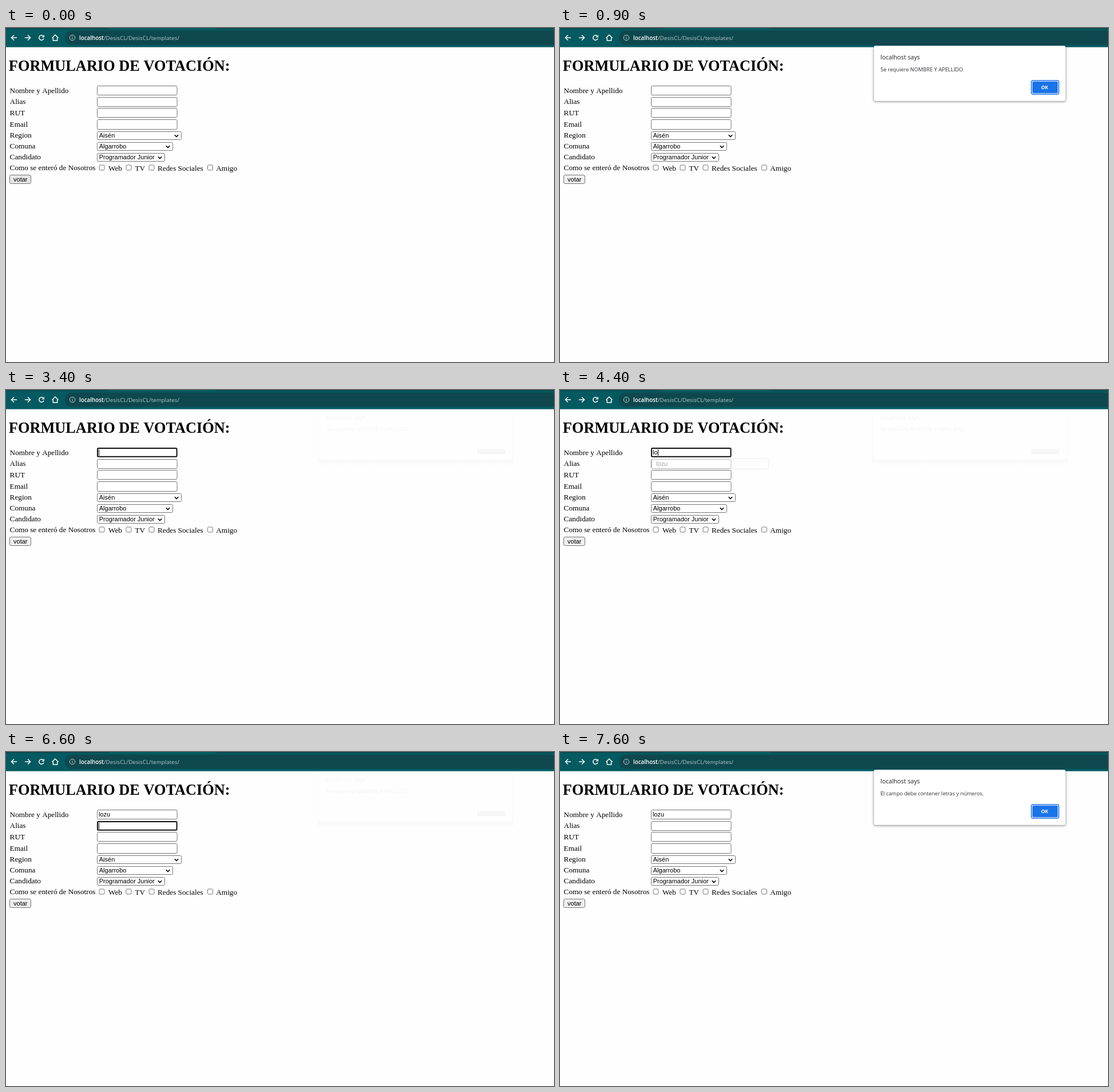
An HTML page with a canvas that plays this animation: 958 by 585 pixels, repeating every 8000 ms.

```html
<!DOCTYPE html>
<html lang="es">
<head>
<meta charset="utf-8">
<title>Formulario de votación</title>
<style>
html, body { margin: 0; width: 100%; height: 100%; overflow: hidden; background: #fefefe; }
canvas { display: block; }
</style>
</head>
<body>
<canvas id="stage" width="958" height="585"></canvas>
<script>
const ctx = document.getElementById('stage').getContext('2d');
const LOOP = 8000;
const SERIF = '"Liberation Serif", serif';
const SANS = '"Liberation Sans", sans-serif';
const UI = '"Open Sans", sans-serif';
const FIELD_TOPS = [101, 121, 140, 160];
const NAME = 'lozu';
const MISSING = { text: 'Se requiere NOMBRE Y APELLIDO', size: 9.3 };
const INVALID = { text: 'El campo debe contener letras y números.', size: 9.2 };

// Each track is a list of [start, value]; the value holds until the next start.
const tracks = {
  button: [[0, '#e7e7e7'], [500, '#f5f5f5'], [700, '#efefef'], [7200, '#e7e7e7'], [7300, '#efefef']],
  focus: [[0, -1], [2400, 0], [6600, 1], [6700, 2], [6800, 3], [7200, -1]],
  caret: [[0, 1], [2900, 0], [3400, 1], [5400, 0], [5900, 1], [6300, 0], [6600, 1]],
  typed: [[0, 0], [3900, 1], [4300, 2], [4700, 3], [4900, 4]],
  hint: [[0, 0], [3900, 1], [4400, 0.5], [4500, 0]],
  ghost: [[0, 0], [2600, 1], [7500, 0]],
  dialog: [
    [0, null],
    [800, { alpha: 0.8, dy: -4, msg: MISSING }],
    [900, { alpha: 1, dy: 0, ring: true, msg: MISSING }],
    [2400, { alpha: 0.97, dy: -4, msg: MISSING }],
    [2500, { alpha: 0.35, dy: -10, msg: MISSING }],
    [2600, null],
    [7400, { alpha: 0.35, dy: -10, msg: INVALID }],
    [7500, { alpha: 0.9, dy: -3, msg: INVALID }],
    [7600, { alpha: 1, dy: 0, ring: true, msg: INVALID }]
  ]
};

function at(track, t) {
  let value = track[0][1];
  for (const [start, v] of track) if (t >= start) value = v;
  return value;
}

function text(str, x, y, font, color = '#000', align = 'left') {
  ctx.font = font;
  ctx.fillStyle = color;
  ctx.textAlign = align;
  ctx.fillText(str, x, y);
}

function box(x, y, w, h, r, fill, stroke, line = 1) {
  ctx.beginPath();
  ctx.roundRect(x, y, w, h, r);
  if (fill) { ctx.fillStyle = fill; ctx.fill(); }
  if (stroke) { ctx.strokeStyle = stroke; ctx.lineWidth = line; ctx.stroke(); }
}

function path(points, color, width) {
  ctx.beginPath();
  points.forEach(([x, y], i) => i ? ctx.lineTo(x, y) : ctx.moveTo(x, y));
  ctx.strokeStyle = color;
  ctx.lineWidth = width;
  ctx.stroke();
}

function fade(x, y, w, h, from, to) {
  const g = ctx.createLinearGradient(0, y, 0, y + h);
  g.addColorStop(0, from);
  g.addColorStop(1, to);
  ctx.fillStyle = g;
  ctx.fillRect(x, y, w, h);
}

function arrow(x, dir) {
  path([[x - 5 * dir, 17], [x + 4.5 * dir, 17]], '#fff', 1.5);
  path([[x, 12.5], [x + 4.6 * dir, 17], [x, 21.5]], '#fff', 1.5);
}

function drawToolbar() {
  ctx.fillStyle = '#035a60';
  ctx.fillRect(0, 0, 958, 33.6);
  ctx.fillStyle = '#0b464b';
  ctx.fillRect(0, 0, 180, 1.5);
  ctx.fillRect(366, 0, 592, 1.5);
  box(103, 4.5, 880, 25, 12.5, '#0e484e');

  arrow(14, -1);
  arrow(38, 1);
  ctx.beginPath();
  ctx.arc(62, 17, 4.2, 0.35, 5.5);
  ctx.strokeStyle = '#fff';
  ctx.lineWidth = 1.5;
  ctx.stroke();
  ctx.fillStyle = '#fff';
  ctx.beginPath();
  ctx.moveTo(67, 11.8);
  ctx.lineTo(67, 16.4);
  ctx.lineTo(62.4, 16.4);
  ctx.fill();
  path([[80.5, 17.5], [86, 12], [91.5, 17.5]], '#fff', 1.5);
  path([[82.3, 16.5], [82.3, 22], [89.7, 22], [89.7, 16.5]], '#fff', 1.5);

  ctx.beginPath();
  ctx.arc(116, 17, 4.7, 0, 7);
  ctx.strokeStyle = '#c3d1d2';
  ctx.lineWidth = 1;
  ctx.stroke();
  ctx.fillStyle = '#c3d1d2';
  ctx.fillRect(115.5, 16.3, 1, 3.4);
  ctx.fillRect(115.5, 14.3, 1, 1.1);
  text('localhost', 128, 20.8, '600 9.8px ' + UI, '#fff');
  text('/DesisCL/DesisCL/templates/', 171, 20.8, '9.85px ' + UI, '#b4c8ca');
}

function drawSelect(value, y, w) {
  box(159.5, y + 0.5, w, 14, 2, '#fff', '#767676');
  text(value, 162.8, y + 11, '10.97px ' + SANS);
  const x = 159 + w - 8, cy = y + 8;
  path([[x - 3.2, cy - 1.8], [x, cy + 1.5], [x + 3.2, cy - 1.8]], '#000', 1.6);
}

function drawForm(t) {
  const body = '13.22px ' + SERIF;
  text('FORMULARIO DE VOTACIÓN:', 4.8, 74.6, 'bold 26.35px ' + SERIF);
  const labels = [
    ['Nombre y Apellido', 113.6], ['Alias', 133], ['RUT', 153], ['Email', 173],
    ['Region', 192], ['Comuna', 211], ['Candidato', 230], ['Como se enteró de Nosotros', 249]
  ];
  for (const [label, y] of labels) text(label, 6.6, y, body);

  const focus = at(tracks.focus, t);
  FIELD_TOPS.forEach((y, i) => {
    const h = i === 3 ? 17 : 16;
    if (i === focus) box(160, y + 1, 138.6, h - 1.2, 1.5, '#fff', '#101010', 2);
    else box(159.5, y + 0.5, 139.6, h, 2, '#fff', '#767676');
  });

  const value = NAME.slice(0, at(tracks.typed, t));
  text(value, 162, 113, '10.97px ' + SANS);
  if (focus >= 0 && at(tracks.caret, t)) {
    const end = focus === 0 ? ctx.measureText(value).width : 0;
    ctx.fillStyle = '#000';
    ctx.fillRect(Math.round(162 + end), FIELD_TOPS[focus] + 3, 1, 11);
  }

  drawSelect('Aisén', 181, 147);
  drawSelect('Algarrobo', 200, 132);
  drawSelect('Programador Junior', 219, 118);

  const checks = [[167.5, 'Web', 179], [214.5, 'TV', 225.5], [254.5, 'Redes Sociales', 265], [357, 'Amigo', 367.3]];
  for (const [x, label, lx] of checks) {
    box(x - 4.5, 240, 9, 9, 2, '#fff', '#767676');
    text(label, lx, 249.6, body);
  }

  box(6.5, 257.5, 37, 15, 2.5, at(tracks.button, t), '#767676');
  text('votar', 25.3, 269, '10.97px ' + SANS, '#000', 'center');
}

function drawHint(alpha) {
  ctx.save();
  ctx.globalAlpha = alpha;
  box(160.5, 119.5, 204, 19, 2, '#fff', '#d5d5d5');
  text(NAME, 168, 133, '10.5px ' + UI, '#333');
  ctx.restore();
}

// Faint afterimage left behind by the closed dialog.
function drawGhost() {
  text('localhost says', 560, 51.5, '10.65px ' + UI, '#f3f3f3');
  text(MISSING.text, 560, 72.3, MISSING.size + 'px ' + UI, '#f3f3f3');
  fade(545, 121, 342, 10, '#f8f8f8', '#fdfdfd');
  ctx.fillStyle = '#fafafa';
  ctx.fillRect(545, 38, 1.5, 86);
  ctx.fillRect(885.5, 38, 1.5, 86);
  box(547, 112, 338, 10.5, [0, 0, 4, 4], '#fefefe');
  fade(824, 103, 49, 9, '#f8f8f8', '#f4f4f4');
}

function drawDialog({ alpha, dy, ring, msg }) {
  ctx.save();
  ctx.globalAlpha = alpha;
  ctx.translate(0, dy);
  ctx.shadowColor = 'rgba(0,0,0,.42)';
  ctx.shadowBlur = 4;
  ctx.shadowOffsetY = 1;
  box(548.5, 31, 335.5, 97, 3, '#fff');
  ctx.shadowColor = 'transparent';
  box(548.5, 31, 335.5, 97, 3, null, 'rgba(0,0,0,.16)', 0.8);
  text('localhost says', 560.3, 55, '10.65px ' + UI, '#202124');
  text(msg.text, 560.3, 76, msg.size + 'px ' + UI, '#303236');
  if (ring) {
    box(824, 92, 48, 24, 3, '#fff', '#1a73e8', 1.5);
    box(825.8, 93.8, 44.4, 20.4, 2, '#1a73e8');
  } else {
    box(824, 92, 48, 24, 3, '#1a73e8');
  }
  text('OK', 847.3, 107, '700 8.6px ' + UI, '#fff', 'center');
  ctx.restore();
}

function draw(t) {
  ctx.fillStyle = '#fefefe';
  ctx.fillRect(0, 0, 958, 585);
  drawToolbar();
  drawForm(t);
  const hint = at(tracks.hint, t);
  const dialog = at(tracks.dialog, t);
  if (hint) drawHint(hint);
  if (at(tracks.ghost, t)) drawGhost();
  if (dialog) drawDialog(dialog);
}

const begin = performance.now();
function tick() {
  draw((performance.now() - begin) % LOOP);
  requestAnimationFrame(tick);
}
tick();
</script>
</body>
</html>
```
